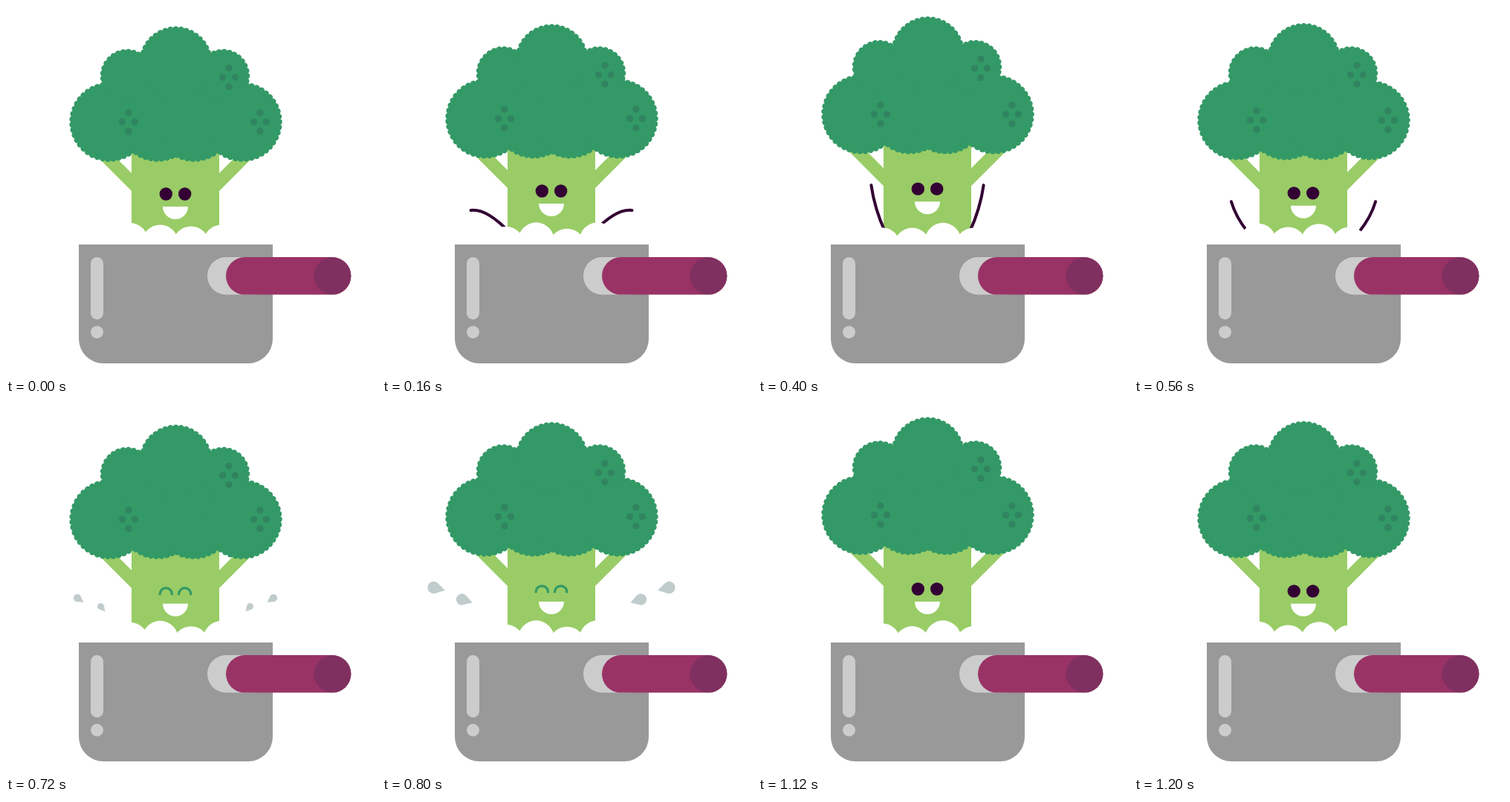
An HTML page with a canvas that plays this animation: 498x498 px, repeating every 1.28 s.

```html
<!DOCTYPE html>
<html lang="en">
<head>
<meta charset="utf-8">
<title>Broccoli in a pan</title>
<style>
html, body { margin: 0; width: 100%; height: 100%; overflow: hidden; background: #fff; }
canvas { display: block; width: 498px; height: 498px; }
</style>
</head>
<body>
<canvas id="stage" width="498" height="498"></canvas>
<script>
const ctx = document.getElementById('stage').getContext('2d');
const LOOP = 1280, STEP = 80, BOB = 640, TAU = Math.PI * 2, MIRROR = 456;
const LEAF = '#339966', SPOT = '#308460', STEM = '#99cc66', INK = '#330033';
const STEEL = '#999999', SHINE = '#cccccc', GRIP = '#993366', GRIP_END = '#803060';

const clamp = v => Math.min(1, Math.max(0, v));
const mix = (a, b, k) => a + (b - a) * k;
const wave = (t, mid, amp, delay) => mid + amp * Math.cos(TAU * (t - delay) / BOB);

function disc(x, y, r, fill) {
  ctx.fillStyle = fill;
  ctx.beginPath();
  ctx.arc(x, y, r, 0, TAU);
  ctx.fill();
}

function box(x, y, w, h, radii, fill) {
  ctx.fillStyle = fill;
  ctx.beginPath();
  ctx.roundRect(x, y, w, h, radii);
  ctx.fill();
}

function bothSides(draw) {
  draw();
  ctx.save();
  ctx.translate(MIRROR, 0);
  ctx.scale(-1, 1);
  draw();
  ctx.restore();
}

// Leafy ball with a frilled edge
function lobe(x, y, r) {
  disc(x, y, r - 2.5, LEAF);
  const n = Math.round(TAU * r / 7.8);
  for (let i = 0; i < n; i++) {
    const a = TAU * i / n;
    disc(x + (r - 3.9) * Math.cos(a), y + (r - 3.9) * Math.sin(a), 4.2, LEAF);
  }
}

function spots(x, y) {
  for (const side of [-1, 1]) {
    disc(x + side * 8.5, y, 4.6, SPOT);
    disc(x, y + side * 12.5, 4.6, SPOT);
  }
}

function body(face) {
  ctx.fillStyle = STEM;
  ctx.fillRect(169, 150, 118, 171);
  bothSides(() => {
    ctx.beginPath();
    ctx.moveTo(170, face - 27);
    ctx.lineTo(170, face - 3);
    ctx.lineTo(109, face - 64);
    ctx.lineTo(133, face - 64);
    ctx.fill();
  });
}

// Higher lobes trail behind the lower ones
function head(t) {
  const low = wave(t, 150.5, 5.7, 20);
  const mid = wave(t, 88, 6.5, 40);
  const top = wave(t, 70.5, 7.2, 50);
  for (const x of [139, 204, 253, 318]) lobe(x, low, 53.5);
  for (const x of [163, 292]) lobe(x, mid, 36);
  lobe(228.5, top, 49.3);
  spots(165, low);
  spots(342, low);
  spots(300, mid + 2);
}

function smile(t, face) {
  const shut = t >= 720 && t < 960;
  for (const x of [215.3, 240.7]) {
    if (shut) {
      ctx.strokeStyle = LEAF;
      ctx.lineWidth = 3.2;
      ctx.lineCap = 'round';
      ctx.beginPath();
      ctx.arc(x, face + 4, 8.2, Math.PI, TAU);
      ctx.stroke();
    } else {
      disc(x, face, 8.7, INK);
    }
  }
  ctx.fillStyle = '#fff';
  ctx.beginPath();
  ctx.arc(228, face + 17, 17, 0, Math.PI);
  ctx.fill();
}

// Lines grow out of the pan, swing in, then drift away
function whips(t) {
  if (t < 80 || t >= 640) return;
  const swing = Math.cos(TAU * (t - 160) / 500);
  const grow = clamp(t / 160), drift = clamp((t - 400) / 160);
  const baseX = 171 - 18 * drift, baseY = 304;
  const tipX = mix(baseX, 136 - 16.5 * swing, grow);
  const tipY = mix(baseY, 258 + 17 * swing, grow);
  const bendX = (baseX + tipX) / 2 - 5;
  const bendY = mix(baseY, 272 + 12 * drift, grow);
  ctx.strokeStyle = INK;
  ctx.lineWidth = 4;
  ctx.lineCap = 'round';
  bothSides(() => {
    ctx.beginPath();
    ctx.moveTo(tipX, tipY);
    ctx.quadraticCurveTo(bendX, bendY, baseX, baseY);
    ctx.stroke();
  });
}

function bubbles(t) {
  const r = 24.3;
  const outer = wave(t, 295.2, -4, 140);
  disc(167, wave(t, 296, -4, -20) + r, r, '#fff');
  disc(207.5, outer + r, r, '#fff');
  disc(249, wave(t, 295.5, 4.3, 137) + r, r, '#fff');
  disc(290, outer + r, r, '#fff');
}

function drop(x, y, size, angle) {
  ctx.save();
  ctx.translate(x, y);
  ctx.rotate(angle * Math.PI / 180);
  ctx.scale(size, size);
  ctx.beginPath();
  ctx.arc(0, 0, 8.2, 1, TAU - 1);
  ctx.quadraticCurveTo(10, -3.5, 16, 0);
  ctx.quadraticCurveTo(10, 3.5, 4.4, 6.9);
  ctx.fill();
  ctx.restore();
}

// Parabola through three points, one unit of u apart
const arc = (u, a, b, c) => a + u * (b - a) + u * (u - 1) / 2 * (c - 2 * b + a);
const swell = (u, life) => Math.max(0, 1.03 * Math.sin(Math.PI * u / life));

function drops(t) {
  const u = (t - 640) / 160;
  if (u <= 0 || u >= 2.8) return;
  const k = clamp(u - 1);
  ctx.fillStyle = `rgb(${mix(192, 140, k)},${mix(204, 194, k)},${mix(203, 171, k)})`;
  bothSides(() => {
    drop(arc(u, 130, 69.5, 38.5), arc(u, 290, 247, 263), swell(u, 2.4), 55 - 40 * u);
    drop(arc(u, 152, 107.5, 80.5), arc(u, 296, 263, 285.5), swell(u, 2.8), 81 - 64 * u);
  });
}

function pan() {
  box(98, 321, 261, 160, [0, 0, 33, 33], STEEL);
  box(114, 338, 17, 84, 8.5, SHINE);
  disc(122.5, 439, 8.5, SHINE);
  box(271, 338, 88, 50.5, 25, SHINE);
  box(296, 338, 168.5, 50.6, 25.3, GRIP);
  disc(439.3, 363.3, 25, GRIP_END);
}

function render(now) {
  const t = Math.floor(now % LOOP / STEP) * STEP;
  const face = wave(t, 249, 4, 0);
  ctx.fillStyle = '#fff';
  ctx.fillRect(0, 0, 498, 498);
  body(face);
  head(t);
  smile(t, face);
  whips(t);
  bubbles(t);
  drops(t);
  pan();
}

const start = performance.now();
function loop() {
  render(performance.now() - start);
  requestAnimationFrame(loop);
}
loop();
</script>
</body>
</html>
```
